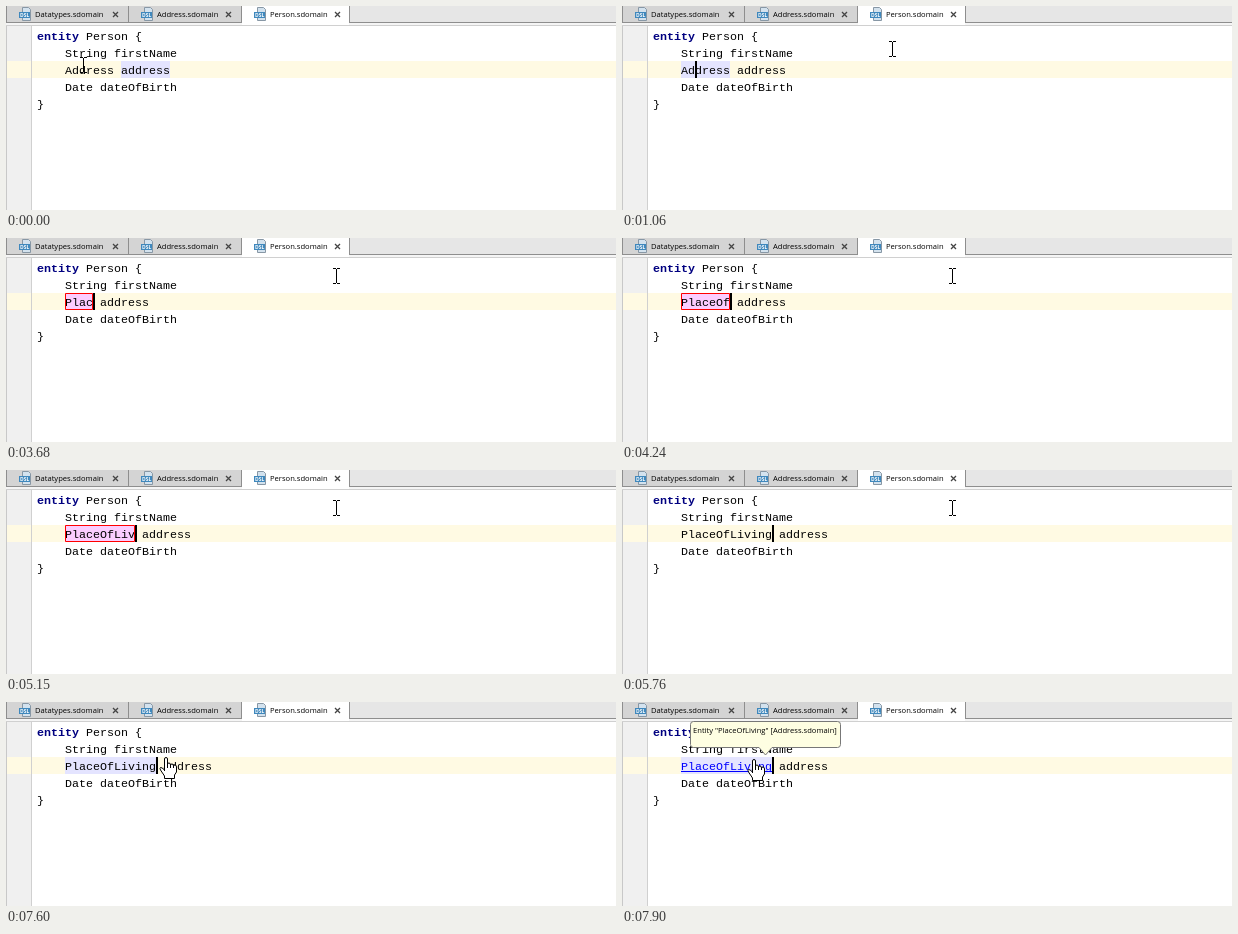
Recreate the animation shown at these times as an HTML page with a canvas. Size 610x204 px, loop 8 s.

```html
<!DOCTYPE html>
<html>
<head>
<meta charset="utf-8">
<style>
html, body { margin: 0; width: 610px; height: 204px; overflow: hidden; background: #fff; }
canvas { display: block; }
</style>
</head>
<body>
<canvas id="stage" width="610" height="204"></canvas>
<script>
const ctx = document.getElementById('stage').getContext('2d');
const LOOP = 8000, CHAR = 7, LEFT = 31, INDENT = 59, ROW = 55, LINE = 17;
const CODE_FONT = '11.667px "Liberation Mono", monospace';
const UI_FONT = '7.6px "Open Sans", sans-serif';
const LAVENDER = '#e4e4ff', NAVY = '#000080';
const NEW_NAME = 'PlaceOfLiving';
const keyTimes = [3200, 3380, 3500, 3680, 3860, 4050, 4240, 4480, 4700, 5150, 5270, 5390, 5510];

// [time, x, y, shape]; each pose holds until the next one
const pointer = [
  [0, 77, 59, 'beam'], [60, 0, 0, ''], [260, 77, 59, 'beam'],
  [990, 150, 52, 'beam'], [1050, 270, 43, 'beam'], [1120, 330, 38, 'beam'],
  [6420, 329, 38, 'beam'], [6460, 328, 38, 'beam'], [6560, 327, 39, 'beam'],
  [6640, 325, 40, 'beam'], [6720, 323, 41, 'beam'], [6820, 322, 41, 'beam'],
  [7000, 321, 42, 'beam'], [7060, 320, 43, 'beam'], [7120, 318, 44, 'beam'],
  [7180, 317, 44, 'beam'], [7240, 316, 44, 'beam'],
  [7420, 285, 45, 'beam'], [7480, 235, 49, 'beam'], [7540, 190, 53, 'beam'],
  [7600, 160, 55, 'hand'], [7660, 148, 56, 'hand'], [7720, 138, 57, 'hand'],
  [7780, 132, 57, 'hand']
];

function rect(color, x, y, w, h) {
  ctx.fillStyle = color;
  ctx.fillRect(x, y, w, h);
}

function text(str, x, y, color = '#000', font = CODE_FONT) {
  ctx.font = font;
  ctx.fillStyle = color;
  ctx.fillText(str, x, y);
}

function shape(path, fill, stroke, width = 1) {
  const p = new Path2D(path);
  ctx.lineWidth = width;
  if (fill) { ctx.fillStyle = fill; ctx.fill(p); }
  if (stroke) { ctx.strokeStyle = stroke; ctx.stroke(p); }
}

function drawTab(x, right, label, closeX, active) {
  rect(active ? '#fff' : '#d4d4d4', x + 1, 0, right - x - 1, active ? 19 : 16);
  rect('#8e8e8e', x, 0, 1, 17);
  rect('#8e8e8e', right, 0, 1, 17);
  const icon = x + 13;
  shape(`M${icon + 3.5} 1.5h6l2 2v11h-8z`, '#d3e2ee', '#8797a5');
  rect('#3f88bd', icon, 6, 11, 6);
  text('DSL', icon + 1, 11, '#fff', 'bold 5px "Open Sans", sans-serif');
  text(label, icon + 16, 11, '#000', UI_FONT);
  shape(`M${closeX - 2.5} 6l5 5m0 -5l-5 5`, '', '#444', 1.3);
}

function drawFrame() {
  rect('#fff', 0, 0, 610, 204);
  rect('#f0f0f0', 0, 20, 25, 184);
  rect('#fffae3', 0, ROW, 610, LINE);
  rect('#d0d0d0', 25, 20, 1, 184);
  rect('#c8c8c8', 0, 17, 1, 187);
  rect('#e6e6e6', 0, 0, 610, 16);
  rect('#8e8e8e', 0, 16, 610, 1);
  rect('#f5f5f5', 0, 17, 610, 2);
  rect('#d0d0d0', 0, 19, 610, 1);
  drawTab(0, 122, 'Datatypes.sdomain', 109.5);
  drawTab(122, 235, 'Address.sdomain', 222.5);
  drawTab(235, 343, 'Person.sdomain', 331.5, true);
  text('entity', LEFT, 34, NAVY, 'bold ' + CODE_FONT);
  text('Person {', LEFT + 7 * CHAR, 34);
  text('String firstName', INDENT, 51);
  text('Date dateOfBirth', INDENT, 85);
  text('}', LEFT, 102);
}

function drawField(t) {
  const typed = keyTimes.filter(k => k <= t).length;
  const name = typed ? NEW_NAME.slice(0, typed) : 'Address';
  const width = name.length * CHAR, end = INDENT + width;
  const selected = t >= 2080 && !typed;
  const editing = typed && t < 5760;
  const linked = t >= 7900;

  if (t < 690) rect(LAVENDER, 115, ROW, 49, LINE);
  if (t >= 990 && t < 2080 || t >= 6120) rect(LAVENDER, INDENT, ROW, width, LINE);
  if (selected || editing) rect(selected ? '#526da5' : '#fbcdff', INDENT, ROW, width, LINE);
  text(name, INDENT, 68, selected ? '#fff' : linked ? '#0000ff' : '#000');
  if (selected || editing) {
    shape(`M${INDENT + .5} ${ROW + .5}h${width - 1}v${LINE - 1}h${1 - width}z`, '', '#ff0000');
  }
  if (linked) rect('#0000ff', INDENT, 69, width, 1);
  text('address', end + CHAR, 68);

  const hidden = [[0, 260], [1810, 2080], [2770, 3200], [6500, 7180]];
  if (!hidden.some(([from, to]) => t >= from && t < to)) {
    rect('#000', typed ? end : t < 690 ? 164 : 73, ROW, 2, LINE);
  }
}

function drawTooltip() {
  shape('M71.5 19.5H215.5q3 0 3 3V42.5q0 3 -3 3H150L143.5 53L137 45.5H71.5q-3 0 -3 -3V22.5q0 -3 3 -3z',
    '#fefee2', '#777');
  text('Entity "PlaceOfLiving" [Address.sdomain]', 71, 31, '#000', UI_FONT);
}

function drawPointer(t) {
  const [, x, y, kind] = pointer.findLast(p => p[0] <= t);
  ctx.save();
  ctx.translate(x, y);
  if (kind === 'beam') {
    shape('M-3 -7.5h3m1 0h3M.5 -7v14M-3 7.5h3m1 0h3', '', '#000');
  } else if (kind === 'hand') {
    shape('M-1.5 14V2q0 -1.5 1.5 -1.5T1.5 2V7q0 -1 1.5 -1T4.5 8q0 -1 1.5 -1T7.5 9q0 -1 1.5 -1T10.5 10V15L8.5 18V21.5H-1.5V19L-5.5 13q-1 -2 0 -2.5T-1.5 13z',
      '#fff', '#000');
    shape('M1.5 7v4M4.5 8v3M7.5 9v2', '', '#000');
  }
  ctx.restore();
}

function render() {
  const t = performance.now() % LOOP;
  drawFrame();
  drawField(t);
  if (t >= 7900) drawTooltip();
  drawPointer(t);
  requestAnimationFrame(render);
}
render();
</script>
</body>
</html>
```
